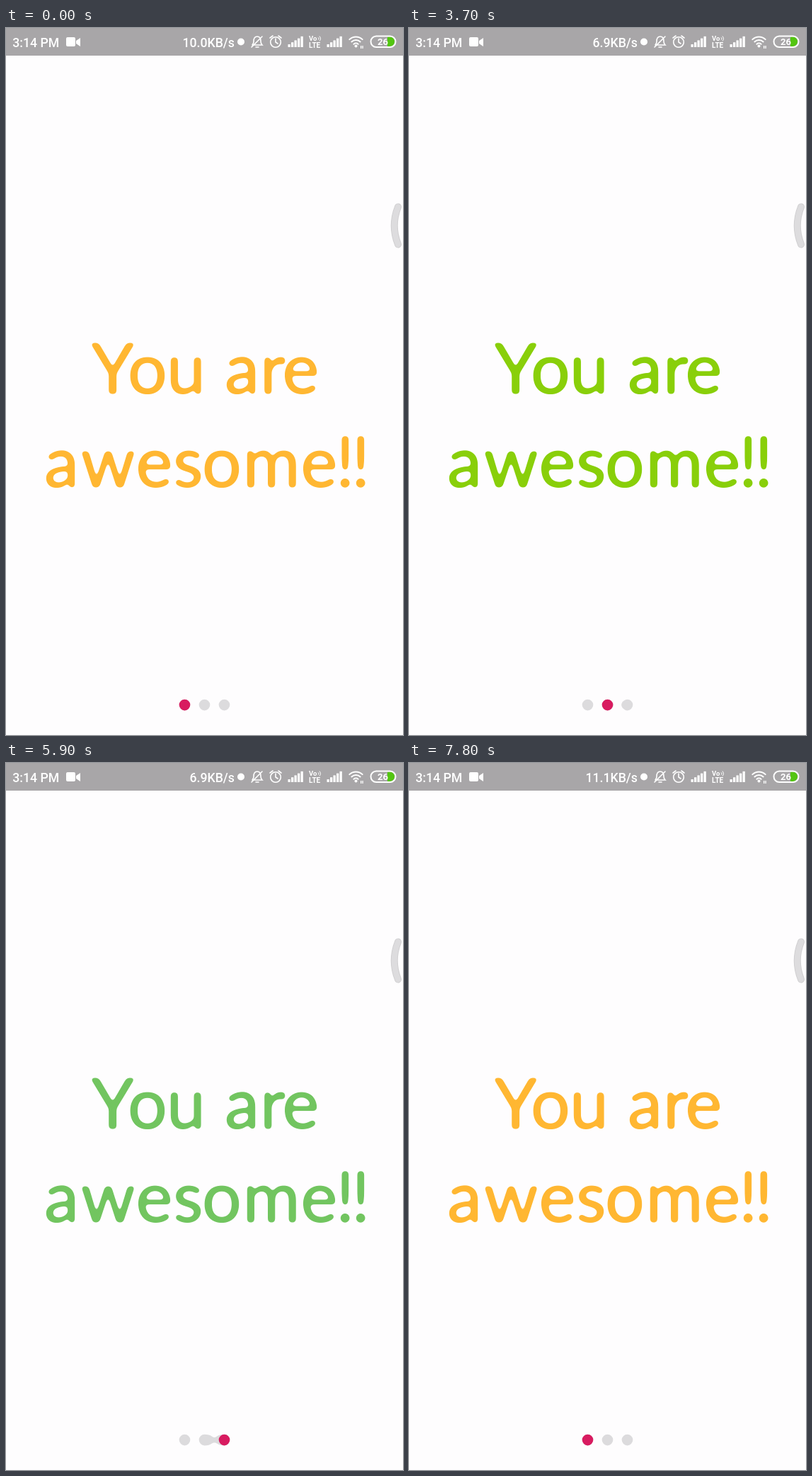
An HTML page with a canvas for the animation above (9400 ms loop, 561 by 998 pixels).

```html
<!DOCTYPE html>
<html lang="en">
<head>
<meta charset="utf-8">
<title>Ink page indicator</title>
<style>
  html, body { margin: 0; width: 100%; height: 100%; overflow: hidden; background: #fefdfe; }
  canvas { position: absolute; left: 0; top: 0; }
  #headline { filter: url(#soften); }
</style>
</head>
<body>
<canvas id="stage" width="561" height="998"></canvas>
<canvas id="headline" width="561" height="998"></canvas>
<!-- Blur, then sharpen the alpha again: this rounds the ends of the letters. -->
<svg width="0" height="0" style="position:absolute">
  <filter id="soften" x="0" y="0" width="100%" height="100%" color-interpolation-filters="sRGB">
    <feGaussianBlur stdDeviation="2.8"/>
    <feColorMatrix values="1 0 0 0 0  0 1 0 0 0  0 0 1 0 0  0 0 0 7 -2.9"/>
  </filter>
</svg>
<script>
const ctx = document.getElementById('stage').getContext('2d');
const headlineCtx = document.getElementById('headline').getContext('2d');
const LOOP = 9400, TICK = 100;
const GREY = '#dcdbdd', RED = '#d81b60';
const PAGE_COLORS = [[255, 183, 50], [140, 208, 0], [77, 181, 230]];

// Page turns: a finger drags to `reach` of the way, lets go, and the pager settles.
const SWIPES = [
  { from: 0, to: 1, start: 2400, release: 2900, reach: 0.75 },
  { from: 1, to: 2, start: 3650, release: 4300, reach: 0.555 },
  { from: 2, to: 1, start: 5450, release: 5950, reach: 0.645 },
  { from: 1, to: 0, start: 6750, release: 7200, reach: 0.88 }
];
const SETTLE = 400;

const clamp = v => Math.min(1, Math.max(0, v));
const mix = (a, b, k) => a + (b - a) * k;

// cubic-bezier(.4, 0, .2, 1)
function fastOutSlowIn(x) {
  let lo = 0, hi = 1;
  for (let i = 0; i < 20; i++) {
    const s = (lo + hi) / 2, q = 1 - s;
    if (1.2 * q * q * s + 0.6 * q * s * s + s * s * s < x) lo = s; else hi = s;
  }
  return lo * lo * (3 - 2 * lo);
}

function swipeProgress(swipe, t) {
  if (t < swipe.release) {
    return swipe.reach * clamp((t - swipe.start) / (swipe.release - swipe.start));
  }
  const u = clamp((t - swipe.release) / SETTLE);
  return mix(swipe.reach, 1, 1 - (1 - u) ** 5);
}

// ---- status bar ----
function label(text, x, y, font, align = 'left') {
  ctx.font = font;
  ctx.textAlign = align;
  ctx.fillText(text, x, y);
}

function circle(x, y, r) {
  ctx.beginPath();
  ctx.arc(x, y, r, 0, 7);
}

function signal(x) {
  for (let i = 0; i < 5; i++) {
    const h = 4 + i * 2.8;
    ctx.fillRect(x + i * 4.5, 27 - h, 3.3, h);
  }
}

const CAMERA = new Path2D('M87 13h9q2 0 2 2v9q0 2-2 2h-9q-2 0-2-2v-9q0-2 2-2zM99 18l6-4v12l-6-4z');
const BELL = new Path2D('M348 24h14q-2-2-2-5c0-5-2-7-5-7s-5 2-5 7q0 3-2 5M353 27h4M347 27L362 12');
const ALARM = new Path2D('M373 14l4-3M389 14l-4-3M381 15v5l3 2');

function statusBar(t) {
  ctx.fillStyle = '#a8a6a8';
  ctx.fillRect(0, 0, 561, 39);
  ctx.fillStyle = ctx.strokeStyle = '#fff';
  ctx.lineWidth = 1.6;
  ctx.lineCap = 'round';

  const speed = t < 2900 ? '10.0KB/s' : t < 6900 ? '6.9KB/s' : '11.1KB/s';
  const barFont = '500 17.7px Roboto, sans-serif';
  label('3:14 PM', 9.3, 26.5, barFont);
  label(speed, 323, 26.5, barFont, 'right');
  ctx.fill(CAMERA);
  circle(332, 19.5, 5);
  ctx.fill();
  ctx.stroke(BELL);
  circle(381, 20, 7.3);
  ctx.stroke();
  ctx.stroke(ALARM);
  signal(398.5);
  signal(453.5);
  label('Vo', 428, 18, '700 9.5px Roboto, sans-serif');
  label('LTE', 428, 27.5, '700 10px Roboto, sans-serif');
  ctx.lineWidth = 1;
  for (const r of [2, 4.5]) {
    ctx.beginPath();
    ctx.arc(440, 15, r, -0.8, 0.8);
    ctx.stroke();
  }

  ctx.lineWidth = 2;
  for (const r of [4.5, 9, 13.5]) {
    ctx.beginPath();
    ctx.arc(494.5, 26, r, -2.32, -0.82);
    ctx.stroke();
  }
  circle(494.5, 25.5, 2);
  ctx.fill();
  ctx.fillRect(501, 25, 1.3, 4);
  ctx.fillRect(503.4, 25, 1.3, 4);

  ctx.fillStyle = '#53c511';
  ctx.beginPath();
  ctx.roundRect(539, 12.5, 10, 13.5, [0, 6.5, 6.5, 0]);
  ctx.fill();
  ctx.beginPath();
  ctx.roundRect(515.5, 11.5, 35, 15.5, 7.7);
  ctx.stroke();
  ctx.fillStyle = '#fff';
  label('26', 532.5, 24, '700 13px Roboto, sans-serif', 'center');
}

function edgeHandle() {
  for (const [color, width] of [['#d0cfd1', 10], ['#dddcde', 8]]) {
    ctx.strokeStyle = color;
    ctx.lineWidth = width;
    ctx.beginPath();
    ctx.moveTo(554, 252.5);
    ctx.quadraticCurveTo(543.5, 279, 554, 305.5);
    ctx.stroke();
  }
}

// ---- headline: letters thickened by a round stroke ----
const STEM = 11, CAP_HEIGHT = 73;
const LINES = [
  { bottom: 516.5, text: 'You are', centers: [151, 200, 254, 0, 332, 380, 417] },
  { bottom: 648.5, text: 'awesome!!', centers: [77, 144, 210, 257, 305, 375, 443, 479, 501] }
];
const headlineFont = size => `400 ${size}px Lato, sans-serif`;

function fitHeadline() {
  headlineCtx.font = headlineFont(100);
  const l = headlineCtx.measureText('l');
  const stem = (l.actualBoundingBoxRight + l.actualBoundingBoxLeft) / 100;
  const cap = headlineCtx.measureText('Y').actualBoundingBoxAscent / 100;
  const size = (CAP_HEIGHT - STEM) / (cap - stem);
  return { size, stroke: Math.max(0.5, STEM - stem * size) };
}
const headlineFit = fitHeadline();

function headline(color) {
  const c = headlineCtx;
  c.clearRect(0, 0, 561, 998);
  c.font = headlineFont(headlineFit.size);
  c.lineJoin = 'round';
  c.lineWidth = headlineFit.stroke;
  c.fillStyle = c.strokeStyle = color;
  for (const { bottom, text, centers } of LINES) {
    const y = bottom - headlineFit.stroke / 2;
    [...text].forEach((ch, i) => {
      if (ch === ' ') return;
      const m = c.measureText(ch);
      const x = centers[i] - (m.actualBoundingBoxRight - m.actualBoundingBoxLeft) / 2;
      c.fillText(ch, x, y);
      c.strokeText(ch, x, y);
    });
  }
}

// ---- page dots ----
const R = 7.8, GAP = 12.4, DOT_Y = 955.6;
const dotX = page => 252.5 + page * (2 * R + GAP);

function dot(x, r = R) {
  circle(x, DOT_Y, r);
  ctx.fill();
}

// One half of a joining pair; dir is 1 when reaching right, -1 when reaching left.
function inkHalf(x, dir, join) {
  ctx.save();
  ctx.translate(x, DOT_Y);
  ctx.scale(dir, 1);
  ctx.beginPath();
  ctx.arc(0, 0, R, Math.PI / 2, Math.PI * 1.5);
  if (join <= 0.5) {
    const tip = R + join * GAP;
    ctx.bezierCurveTo(R / 2, -R, tip, -R / 2, tip, 0);
    ctx.bezierCurveTo(tip, R / 2, R / 2, R, 0, R);
  } else {
    const a = (join - 0.2) * 1.25, mid = R + GAP / 2, h = a * R;
    ctx.bezierCurveTo(mid - h, -R, mid - R + h, -h, mid, -h);
    ctx.lineTo(mid + 0.5, -h);
    ctx.lineTo(mid + 0.5, h);
    ctx.lineTo(mid, h);
    ctx.bezierCurveTo(mid - R + h, h, mid - h, R, 0, R);
  }
  ctx.fill();
  ctx.restore();
}

function indicator(page, swipe, progress, t) {
  ctx.fillStyle = GREY;
  if (!swipe) {
    [0, 1, 2].forEach(p => dot(dotX(p)));
    ctx.fillStyle = RED;
    dot(dotX(page));
    return;
  }
  const { from, to } = swipe;
  const since = t - swipe.release;
  const retreat = fastOutSlowIn(clamp((since - 244) / 200));
  const reveal = fastOutSlowIn(clamp((since - 300) / 200));
  const move = fastOutSlowIn(clamp((since - 100) / 300));

  for (const p of [0, 1, 2]) if (p !== from && p !== to) dot(dotX(p));
  if (since < 244) {
    const left = Math.min(from, to);
    inkHalf(dotX(left), 1, progress);
    inkHalf(dotX(left + 1), -1, progress);
  } else {
    const tail = mix(dotX(from), dotX(to), retreat), head = dotX(to);
    ctx.beginPath();
    ctx.roundRect(Math.min(tail, head) - R, DOT_Y - R, Math.abs(tail - head) + 2 * R, 2 * R, R);
    ctx.fill();
    dot(dotX(from), R * reveal);
  }
  ctx.fillStyle = RED;
  dot(mix(dotX(from), dotX(to), move));
}

function draw(now) {
  const t = Math.floor((now % LOOP) / TICK) * TICK;
  const latest = SWIPES.filter(s => t > s.start).pop();
  const active = latest && t < latest.release + 600 ? latest : null;
  const page = latest ? latest.to : 0;
  const progress = active ? swipeProgress(active, t) : 0;
  const a = PAGE_COLORS[active ? active.from : page], b = PAGE_COLORS[page];
  const color = a.map((v, i) => Math.round(mix(v, b[i], progress)));

  ctx.fillStyle = '#fefdfe';
  ctx.fillRect(0, 0, 561, 998);
  statusBar(t);
  edgeHandle();
  headline(`rgb(${color})`);
  indicator(page, active, progress, t);
}

const begin = performance.now();
function frame() {
  draw(performance.now() - begin);
  requestAnimationFrame(frame);
}
frame();
</script>
</body>
</html>
```
